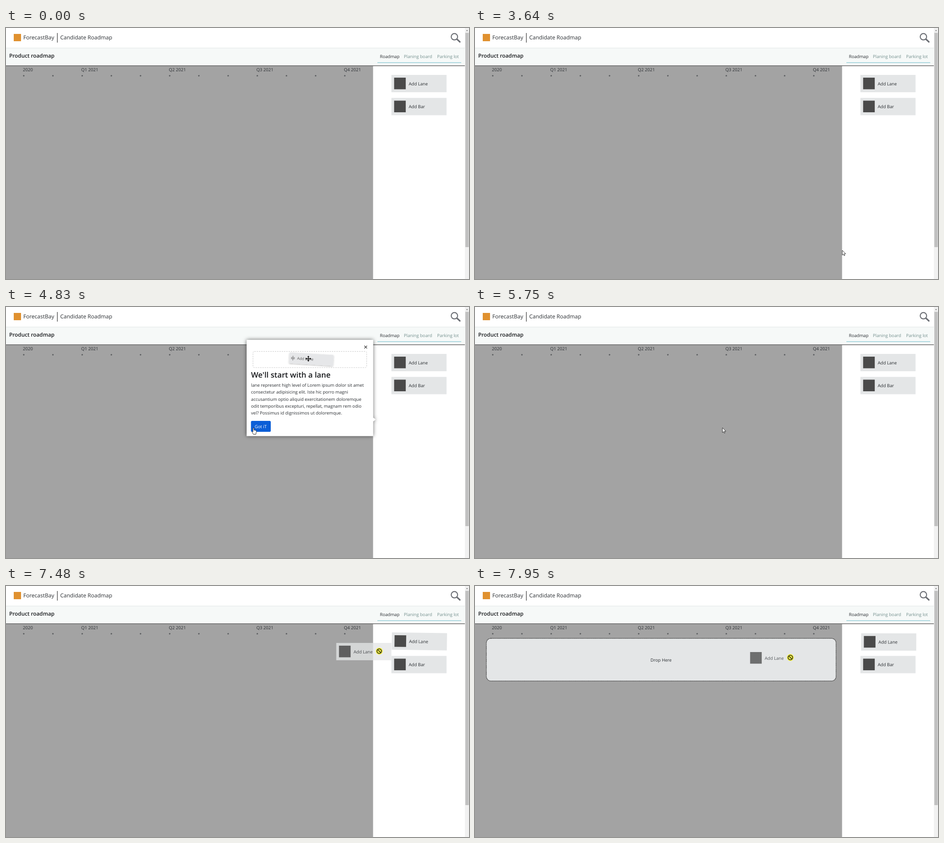
Write an HTML page that moves like this. It is 1016 px wide and 551 px high and loops after 8000 ms.

```html
<!DOCTYPE html>
<html lang="en">
<head>
<meta charset="utf-8">
<title>Roadmap demo</title>
<style>
html, body { margin: 0; width: 100%; height: 100%; overflow: hidden; background: #fff; }
svg { display: block; width: 1016px; height: 551px; font: 9.6px "Open Sans", "Noto Sans", sans-serif; fill: #2b2f33; text-rendering: geometricPrecision; }
.bold { font-weight: 600; fill: #17191c; }
</style>
</head>
<body>
<svg viewBox="0 0 1016 551">
  <defs>
    <filter id="shade" x="-20%" y="-20%" width="140%" height="140%">
      <feDropShadow dx="0" dy="0" stdDeviation="4.5" flood-opacity=".6"/>
    </filter>
    <filter id="soft" x="-20%" y="-50%" width="140%" height="200%">
      <feDropShadow dx="0" dy="1" stdDeviation="1.5" flood-opacity=".3"/>
    </filter>
    <g id="lane">
      <rect width="121" height="38" fill="#e4e6e7"/>
      <rect x="6" y="6" width="25.5" height="25.5" fill="#4a4a4a"/>
      <text x="38" y="22.7">Add Lane</text>
    </g>
  </defs>

  <rect width="1016" height="551" fill="#fff"/>
  <rect x="17" y="13" width="16" height="16" fill="#e0912f"/>
  <g font-size="12">
    <text x="38" y="25.3">ForecastBay</text>
    <text x="119" y="25.3">Candidate Roadmap</text>
  </g>
  <rect x="112" y="11" width="1.2" height="21" fill="#333"/>
  <g fill="none" stroke="#6c6f75">
    <circle cx="984" cy="19.2" r="7" stroke-width="2.2"/>
    <path d="M989.5 24.5l6.5 6" stroke-width="3.2" stroke-linecap="round"/>
  </g>

  <rect y="43.5" width="1007" height="39" fill="#f6f9f8"/>
  <rect y="43.5" width="1007" height="1" fill="#e3e8e8"/>
  <text class="bold" x="7" y="65.3" font-size="11.8">Product roadmap</text>
  <text x="820.5" y="66">Roadmap</text>
  <g fill="#75918f">
    <text x="873" y="66">Planing board</text>
    <text x="946" y="66">Parking lot</text>
  </g>
  <rect x="815" y="75" width="184" height="2" fill="#add8df"/>

  <rect y="83" width="805.5" height="468" fill="#a3a3a3"/>
  <rect y="82" width="1007" height="1.6" fill="#707070"/>
  <g id="months"></g>

  <g id="drop">
    <rect x="25" y="115" width="767.3" height="93.5" rx="10" fill="#e4e6e7" stroke="#111" stroke-width="1.4" stroke-dasharray="1.4 1.4"/>
    <text x="385" y="165.5">Drop Here</text>
  </g>

  <use id="source" href="#lane"/>
  <g transform="translate(845.7 153.5)">
    <rect width="121" height="38" fill="#e4e6e7"/>
    <rect x="6" y="6" width="25.5" height="25.5" fill="#4a4a4a"/>
    <text x="38" y="22.7">Add Bar</text>
  </g>

  <rect x="1007" width="9" height="551" fill="#f1f1f1"/>
  <rect x="1008" y="10.5" width="7.5" height="470.5" fill="#c1c1c1"/>
  <path d="M1009.7 6.5h4l-2-2.5z" fill="#777"/>

  <g id="modal">
    <path d="M528 72H805.7V243L811 247L805.7 251V283.3H528z" fill="#fff" filter="url(#shade)"/>
    <path d="M786.3 85l6 6m0-6l-6 6" stroke="#444" stroke-width="1.3"/>
    <rect x="542" y="97.5" width="249.5" height="35.5" rx="3" fill="none" stroke="#c9c9c9" stroke-dasharray="3 2"/>
    <g transform="translate(670 114.5) rotate(3.5)">
      <rect x="-48.5" y="-12" width="97" height="24" rx="2" fill="#e6e7e9" filter="url(#soft)"/>
      <path d="M-44.5 -1h8M-44.5 1.5h8M-40.5 -4.8v2.5M-40.5 2.8v2.5" stroke="#555" fill="none"/>
      <text x="-31" y="3" font-size="8.2" fill="#555">Add Lane</text>
    </g>
    <path d="M658.5 113.5h10M663.5 108.5v10M660 112l-2 1.5 2 1.5M667 112l2 1.5-2 1.5M662 110l1.5-2 1.5 2M662 117l1.5 2 1.5-2" fill="none" stroke="#111" stroke-width="1.3"/>
    <text class="bold" x="537.8" y="155" font-size="16.8">We'll start with a lane</text>
    <g id="body"></g>
    <rect id="ok" x="537.5" y="250" width="43.5" height="24" rx="2.5"/>
    <text x="545.7" y="265.6" fill="#fff">Got iT</text>
  </g>

  <use id="ghost" href="#lane" opacity=".76"/>
  <g id="cursor">
    <circle id="press" r="7.6" fill="#f4ee00" opacity=".75"/>
    <path id="arrow" d="M0 0V10.6L2.4 8.4 4 12 5.7 11.2 4.1 7.7H7.5z" fill="#fff" stroke="#222" stroke-width=".9"/>
    <path id="hand" d="M-1 7V1Q0 -.6 1.2 1V5L5.5 6Q6.6 6.5 6.4 8.5L5.3 14.5H-.2L-3 9.5Q-2.6 7.8 -1 9z" fill="#fff" stroke="#222" stroke-width=".9"/>
    <path id="no" d="M5 0A5 5 0 1 1 -5 0A5 5 0 1 1 5 0M-3.5 -3.5L3.5 3.5" fill="none" stroke="#222" stroke-width="1.5"/>
  </g>
</svg>
<script>
const $ = id => document.getElementById(id);
const LOOP = 8000, DRAG = 7290, GRAB = [940, 121], HOME = [845.7, 103];

const label = (x, y, s, extra = "") => `<text x="${x}" y="${y}" ${extra}>${s}</text>`;
const quarters = { 0: "2020", 2: "Q1 2021", 5: "Q2 2021", 8: "Q3 2021", 11: "Q4 2021" };
let months = "";
for (let i = 0; i < 12; i++) {
  const x = 37 + i * 64.05;
  if (quarters[i]) months += label(x, 95, quarters[i]);
  months += label(x + 2, 109.3, "*", 'font-size="8" text-anchor="middle"');
}
$("months").innerHTML = months;
$("body").innerHTML = [
  "lane represent high level of Lorem ipsum dolor sit amet",
  "consectetur adipisicing elit. Iste hic porro magni",
  "accusantium optio aliquid exercitationem doloremque",
  "odit temporibus excepturi, repellat, magnam rem odio",
  "vel? Possimus id dignissimos ut doloremque."
].map((s, i) => label(537.8, 175 + i * 15.3, s)).join("");

// Pointer moves: start, end, steps, bend point, destination
const moves = [
  [300, 730, 6, [940, 480], [921, 443]],
  [880, 1010, 3, [905, 442], [893, 442]],
  [2280, 2440, 3, [834, 472], [812, 485]],
  [3640, 3640, 1, [806, 488], [806, 488]],
  [3740, 3740, 1, [760, 351], [760, 351]],
  [4100, 4660, 8, [600, 205], [543, 265]],
  [6000, 6320, 5, [1080, 190], [964, 124]],
  [6540, 6780, 4, [965, 112], GRAB],
  [DRAG, 7950, 9, [850, 143], [692, 157]]
];

function pointer(t) {
  let p = [990, 560];
  for (const [start, end, n, bend, to] of moves) {
    if (t < start) break;
    const step = n > 1 ? Math.min(n - 1, Math.floor((t - start) / (end - start) * (n - 1) + 1e-6)) : 0;
    const left = (1 - (step + 1) / n) ** 2, u = 1 - left;
    p = p.map((a, k) => a * left * left + 2 * u * left * bend[k] + to[k] * u * u);
  }
  return p;
}

// Shake keyframes: x, y, degrees
const shakes = [[1, 1, 0], [-1, -2, -1], [-3, 0, 1], [3, 2, 0], [1, -1, 1], [-1, 2, -1],
  [-3, 1, 0], [3, 1, -1], [-1, -1, 1], [1, 2, 0], [1, -2, -1]];

function shake(t) {
  const f = t % 500 / 50, i = Math.floor(f);
  return shakes[i].map((a, k) => a + (shakes[i + 1][k] - a) * (f - i));
}

function modalAlpha(t) {
  if (t < 3740 || t >= 5750) return 0;
  return t < 5520 ? 1 : 0.75 - Math.floor((t - 5520) / 77) * 0.25;
}

const show = (id, on) => $(id).style.display = on ? "" : "none";
const place = (id, x, y, more = "") => $(id).setAttribute("transform", `translate(${x} ${y})${more}`);

function draw(t) {
  const [x, y] = pointer(t), alpha = modalAlpha(t), dragging = t >= DRAG;
  const hover = alpha > 0 && x > 537 && x < 581 && y > 250 && y < 274;

  show("modal", alpha > 0);
  $("modal").setAttribute("opacity", alpha);
  $("ok").setAttribute("fill", hover ? "#0b5ed7" : "#0d6efd");

  show("cursor", t >= 300);
  place("cursor", x, y);
  show("press", t >= 6990);
  show("hand", hover);
  show("no", dragging);
  show("arrow", !hover && !dragging);

  show("drop", dragging && x < 805);
  show("ghost", dragging);
  place("ghost", HOME[0] + x - GRAB[0], HOME[1] + y - GRAB[1]);

  const [dx, dy, turn] = dragging ? shake(t - DRAG) : [0, 0, 0];
  place("source", HOME[0] + dx * 0.64, HOME[1] + dy * 0.64, ` rotate(${turn} 60.5 19)`);
}

const begin = performance.now();
function tick() {
  draw((performance.now() - begin) % LOOP);
  requestAnimationFrame(tick);
}
tick();
</script>
</body>
</html>
```
